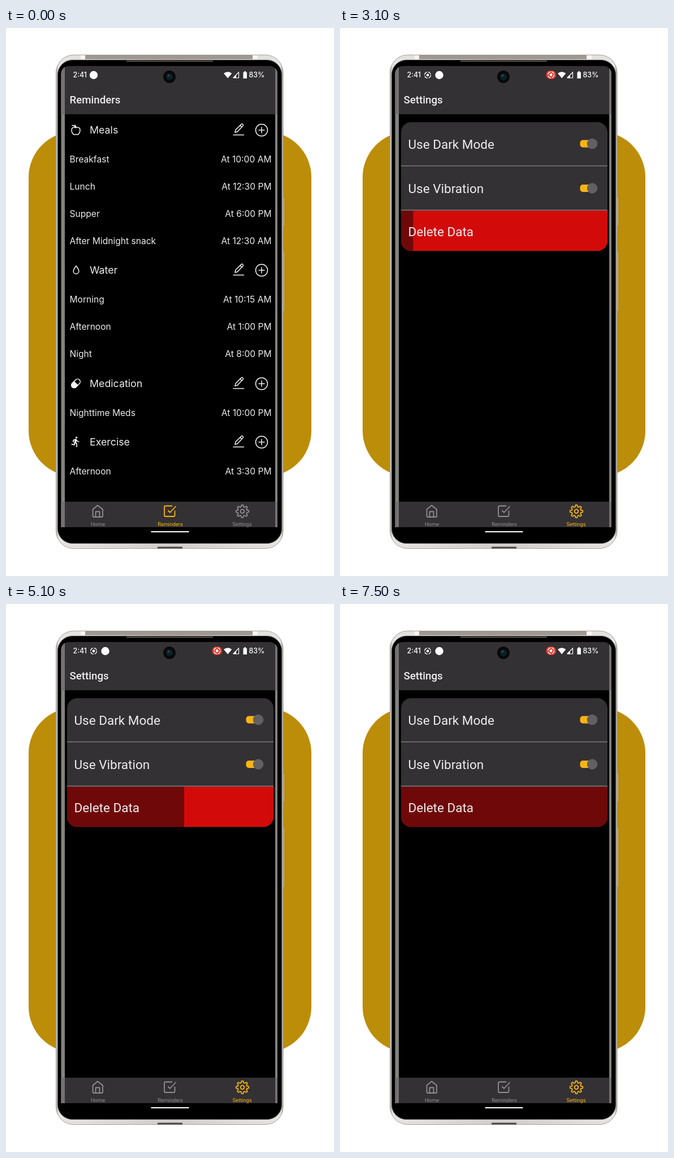
Recreate the animation shown at these times as an HTML page. Size 580 by 966 pixels, loop 8000 ms.

```html
<!DOCTYPE html>
<html lang="en">
<head>
<meta charset="utf-8">
<title>Reminders app</title>
<style>
  html, body { margin: 0; width: 100%; height: 100%; overflow: hidden; background: #fff; }
  svg { display: block; width: 580px; height: 966px; }
  text { fill: #eeecee; font-family: Roboto, sans-serif; }
  .line { fill: none; stroke: #f2f2f2; stroke-width: 1.5; stroke-linejoin: round; stroke-linecap: round; }
  .title { font-size: 18.7px; font-weight: 500; }
  .status { font: 500 12.4px Inter, sans-serif; fill: #fff; }
  .group { font: 400 17.8px Inter, sans-serif; }
  .item { font: 400 15.6px Inter, sans-serif; }
  .end { text-anchor: end; }
  .option { font-size: 22.5px; }
  .tab { --tint: #918f92; }
  .tab.on { --tint: #fbb40f; }
  .tab text { font-size: 9.4px; text-anchor: middle; fill: var(--tint); }
  .tab path, .tab circle { fill: none; stroke: var(--tint); stroke-width: 1.8; stroke-linejoin: round; stroke-linecap: round; }
</style>
</head>
<body>
<svg viewBox="0 0 580 966">
  <defs>
    <linearGradient id="metal" x2="1" y2="0">
      <stop offset="0" stop-color="#aaa8a5"/><stop offset=".012" stop-color="#e6e4e1"/>
      <stop offset=".5" stop-color="#d0cecb"/>
      <stop offset=".988" stop-color="#e6e4e1"/><stop offset="1" stop-color="#999794"/>
    </linearGradient>
    <clipPath id="screen"><rect x="97.500" y="67" width="382.500" height="836" rx="14"/></clipPath>
    <clipPath id="card"><rect x="108" y="166" width="365" height="227" rx="18"/></clipPath>
    <g id="actions" class="line">
      <path d="M402 188.500h18.500M405 184l1-4.500L416.300 169.400q1.300-.8 2.500.4t.4 2.500L409.300 182.700zM414 171.700l3 3"/>
      <circle cx="452" cy="180" r="10.500"/>
      <path d="M447 180h10M452 175v10"/>
    </g>
    <g id="toggle">
      <rect x="424.500" y="-6.500" width="24" height="13" rx="5" fill="#fbb415"/>
      <circle cx="446" r="9.300" fill="#626063"/>
    </g>
    <g id="record" fill="none" stroke="#fff" stroke-width="1.300">
      <circle r="5.400" stroke-dasharray="6.500 1.980"/>
      <circle r="2.400" fill="#fff" stroke="none"/>
    </g>
  </defs>

  <rect x="40" y="183" width="500" height="607" rx="80" fill="#bc8d09"/>

  <!-- phone body -->
  <path d="M490 298v52M490 394v106" stroke="#85827f" stroke-width="4"/>
  <path d="M491 299v50M491 395v104" stroke="#d5d2cf"/>
  <rect x="88.500" y="47.500" width="401.500" height="870" rx="31" fill="url(#metal)" stroke="#a4a29f"/>
  <path d="M140 51.500h296" stroke="#9f9790" stroke-width="7"/>
  <path d="M132 51.500h8M436 51.500h9" stroke="#f5f4f2" stroke-width="7"/>
  <path d="M268 916h44" stroke="#4a4847" stroke-width="3"/>
  <rect x="91.500" y="56.500" width="396" height="852" rx="26" stroke="#4d4b4a"/>
  <path d="M213 58.500h153" stroke="#4b4744" stroke-width="2.500"/>

  <!-- shared screen -->
  <g clip-path="url(#screen)">
    <path d="M97 67h384v85H97zM97 835h384v45H97z" fill="#333134"/>
    <path d="M97 67h7v813h-7zM476 67h4v813h-4z" fill="#82827e"/>
    <path d="M97 67h7v85h-7zM97 835h7v45h-7zM476 67h4v85h-4zM476 835h4v45h-4z" fill="#737174"/>
  </g>
  <circle cx="289" cy="86" r="11" fill="#080909"/>
  <circle cx="289" cy="86" r="6" fill="#0b2027"/>
  <circle cx="287.500" cy="84" r="2" fill="#284750"/>
  <path d="M256.500 888h67" stroke="#fff" stroke-width="2"/>

  <text class="status" x="118.500" y="87">2:41</text>
  <text class="status" x="429.500" y="87">83%</text>
  <use id="recordIcon" href="#record" x="155" y="83"/>
  <circle id="appDot" cy="83" r="7.200" fill="#fff"/>
  <g id="chip">
    <rect x="364.500" y="75" width="17.500" height="15" rx="7" fill="#e0392f"/>
    <use href="#record" x="373.200" y="82.500"/>
  </g>
  <path d="M385 80q7.200-5.500 14.400 0L392.200 88.500zM419.500 78h1.700v-1.700h3V78h1.700v11h-6.400z" fill="#fff"/>
  <path d="M402 88V87.500L411.500 78V88z" fill="none" stroke="#fff" stroke-width="1.200"/>
  <path d="M402 88l5-5v5z" fill="#fff"/>

  <text id="title" class="title" x="112.500" y="133"></text>

  <g id="reminders">
    <g class="line">
      <path d="M123.500 176c-2.500-2-7.500-1-7.500 4 0 4 2.500 8 5 8 1 0 1.500-.6 2.500-.6s1.500.6 2.500.6c2.500 0 5-4 5-8 0-5-5-6-7.500-4zM123.500 176q.5-3-1.500-5M117 172q4-1 5.500 3"/>
      <path d="M124 419.500c-2.700 3.500-4.800 6.200-4.800 9.200a4.800 4.800 0 0 0 9.600 0c0-3-2.100-5.700-4.800-9.200z"/>
      <g transform="translate(123.500 626.500) rotate(-45)">
        <rect x="-9" y="-4.700" width="18" height="9.400" rx="4.700"/>
        <path d="M0-4.700H-4.300a4.700 4.700 0 0 0 0 9.400H0z" fill="#f2f2f2"/>
      </g>
    </g>
    <path transform="translate(113 719) scale(.86)" fill="#f2f2f2" d="M13.500 5.500a2 2 0 1 0 0-4 2 2 0 0 0 0 4zM9.900 19.400l1-4.400 2.100 2v6h2v-7.500l-2.100-2 .6-3c1.300 1.500 3.300 2.500 5.500 2.500v-2c-1.900 0-3.500-1-4.300-2.400l-1-1.600c-.4-.6-1-1-1.700-1-.3 0-.5.1-.8.1L6 8.300V13h2V9.600l1.800-.7-1.600 8.100-4.900-1-.4 2z"/>
  </g>

  <g id="settings">
    <g clip-path="url(#card)">
      <path d="M108 166h365v227H108z" fill="#333134"/>
      <path d="M108 243h365M108 321h365" stroke="#6a686b" stroke-width="2"/>
      <path d="M108 322h365v71H108z" fill="#d20a0a"/>
      <rect id="progress" x="108" y="322" height="71" fill="#6f0809"/>
    </g>
    <text class="option" x="120.500" y="213">Use Dark Mode</text>
    <text class="option" x="120.500" y="291">Use Vibration</text>
    <text class="option" x="120.500" y="366.500">Delete Data</text>
    <use href="#toggle" y="204"/>
    <use href="#toggle" y="282.500"/>
  </g>

  <g class="tab">
    <path d="M153.500 848.500l8.500-7 9 7v11.500q0 2-2 2h-13.500q-2 0-2-2zM158.500 862v-9.500h7V862"/>
    <text x="162.500" y="878">Home</text>
  </g>
  <g class="tab" id="remindersTab">
    <path d="M287 851l3 3 10-10.500M298.500 851.500v7.500q0 2-2 2h-14.500q-2 0-2-2v-14.500q0-2 2-2h11.500"/>
    <text x="290.500" y="878">Reminders</text>
  </g>
  <g class="tab" id="settingsTab">
    <path id="gear"/>
    <circle cx="418" cy="852" r="3.300"/>
    <text x="417.500" y="878">Settings</text>
  </g>
</svg>

<script>
const $ = id => document.getElementById(id);
const clamp = (v, lo = 0, hi = 1) => Math.min(hi, Math.max(lo, v));

const groups = [
  ['Meals', 180, ['Breakfast', '10:00 AM'], ['Lunch', '12:30 PM'], ['Supper', '6:00 PM'], ['After Midnight snack', '12:30 AM']],
  ['Water', 427, ['Morning', '10:15 AM'], ['Afternoon', '1:00 PM'], ['Night', '8:00 PM']],
  ['Medication', 627, ['Nighttime Meds', '10:00 PM']],
  ['Exercise', 730, ['Afternoon', '3:30 PM']]
];
const label = (cls, x, y, str) => `<text class="${cls}" x="${x}" y="${y}">${str}</text>`;
$('reminders').innerHTML += groups.map(([name, y, ...items]) =>
  label('group', 148, y + 5.5, name) + `<use href="#actions" y="${y - 180}"/>` +
  items.map(([what, when], i) => {
    const base = y + 57 + i * 48;
    return label('item', 112.5, base, what) + label('item end', 469.5, base, 'At ' + when);
  }).join('')
).join('');

$('gear').setAttribute('d', 'M' + Array.from({ length: 160 }, (_, i) => {
  const a = i * Math.PI / 80;
  const r = 9.7 + 1.5 * clamp(1.7 * Math.cos(8 * a), -1, 1);
  return [(418 + r * Math.sin(a)).toFixed(2), (852 - r * Math.cos(a)).toFixed(2)];
}).join('L') + 'Z');

// cubic-bezier(.42, 0, 1, 1), solved by bisection
function ease(x) {
  let lo = 0, hi = 1;
  for (let i = 0; i < 24; i++) {
    const s = (lo + hi) / 2;
    if (1.26 * s + .48 * s * s - .74 * s ** 3 < x) lo = s; else hi = s;
  }
  return lo * lo * (3 - 2 * lo);
}
const easeInOut = t => t < .5 ? ease(2 * t) / 2 : 1 - ease(2 - 2 * t) / 2;

function draw(now) {
  const t = Math.floor(now % 8000 / 100) * 100;
  const onSettings = t >= 1300;
  $('reminders').style.display = onSettings ? 'none' : '';
  $('settings').style.display = onSettings ? '' : 'none';
  $('title').textContent = onSettings ? 'Settings' : 'Reminders';
  $('remindersTab').classList.toggle('on', !onSettings);
  $('settingsTab').classList.toggle('on', onSettings);

  const notice = clamp(t / 600);
  $('appDot').setAttribute('cx', 155 + 20.5 * notice);
  $('recordIcon').style.opacity = $('chip').style.opacity = notice;

  $('progress').setAttribute('width', 365 * easeInOut(clamp((t - 2393) / 5000)));
}

const start = performance.now();
(function loop() {
  draw(performance.now() - start);
  requestAnimationFrame(loop);
})();
</script>
</body>
</html>
```
